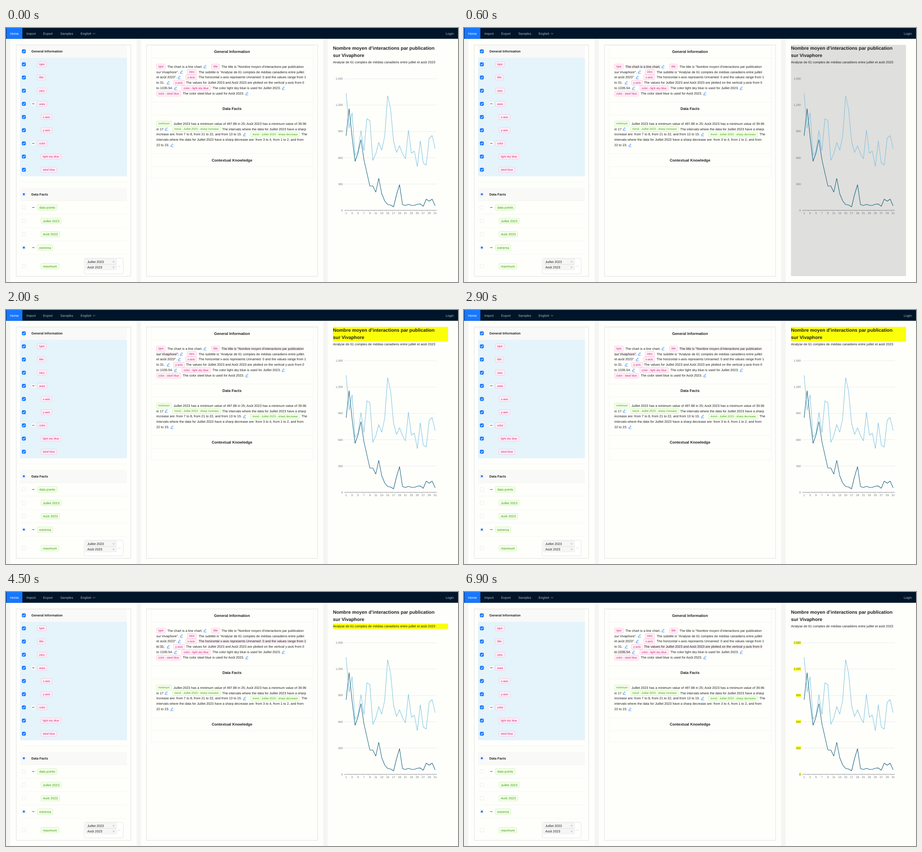
These frames come from a looping animation (998 by 561 pixels, 8 s). An HTML page:

```html
<!DOCTYPE html>
<html lang="en">
<head>
<meta charset="utf-8">
<title>Chart description</title>
<style>
html, body { margin: 0; width: 100%; height: 100%; overflow: hidden; background: #f5f5f3; }
svg { display: block; width: 100vw; height: 100vh; }
text { font: 7.28px "Liberation Sans", Arial, sans-serif; fill: #1f1f1f; text-rendering: geometricPrecision; }
.bold { font-weight: 700; }
.head { font-weight: 700; font-size: 8.32px; text-anchor: middle; }
.title { font-weight: 700; font-size: 10.4px; }
.nav { fill: #b0b6bd; }
.axis { font-size: 6.24px; fill: #6e7079; }
.small { font-size: 6.24px; }
.pink { fill: #c41d7f; }
.green { fill: #389e0d; }
.show { opacity: 0; animation: 8s step-end infinite; }
.mark { fill: #fbff0a; }
.hover { fill: #f7eef3; }

@keyframes typeText  { 0% { opacity: 0 } 7.5%   { opacity: 1 } 23.75% { opacity: 0 } }
@keyframes chartBg   { 0% { opacity: 0 } 7.5%   { opacity: 1 } 25%    { opacity: 0 } }
@keyframes titleText { 0% { opacity: 0 } 23.75% { opacity: 1 } 42.5%  { opacity: 0 } }
@keyframes titleBg   { 0% { opacity: 0 } 25%    { opacity: 1 } 42.5%  { opacity: 0 } }
@keyframes introText { 0% { opacity: 0 } 42.5%  { opacity: 1 } 56.25% { opacity: 0 } }
@keyframes introBg   { 0% { opacity: 0 } 42.5%  { opacity: 1 } 62.5%  { opacity: 0 } }
@keyframes xText     { 0% { opacity: 0 } 56.25% { opacity: 1 } 81.25% { opacity: 0 } }
@keyframes xBg       { 0% { opacity: 0 } 73.75% { opacity: 1 } 86.25% { opacity: 0 } }
@keyframes yText     { 0% { opacity: 0 } 81.25% { opacity: 1 } 100%   { opacity: 1 } }
@keyframes yBg       { 0% { opacity: 0 } 86.25% { opacity: 1 } 100%   { opacity: 1 } }
</style>
</head>
<body>
<svg id="stage" viewBox="0 0 998 561" preserveAspectRatio="none"></svg>
<script>
const stage = document.getElementById('stage');

function add(tag, attrs, content) {
  const el = document.createElementNS('http://www.w3.org/2000/svg', tag);
  for (const k in attrs) el.setAttribute(k, attrs[k]);
  if (content !== undefined) el.textContent = content;
  return stage.appendChild(el);
}
const rect = (x, y, w, h, attrs) => add('rect', { x, y, width: w, height: h, ...attrs });
const text = (x, y, str, cls = '', attrs) => add('text', { x, y, class: cls, ...attrs }, str);
const path = (d, stroke, width = 1, attrs) =>
  add('path', { d, stroke, 'stroke-width': width, fill: 'none', ...attrs });
const hline = (x1, x2, y, stroke, width = .6) => path(`M${x1} ${y}H${x2}`, stroke, width);

function show(el, name, cls) {
  el.setAttribute('class', 'show ' + cls);
  el.style.animationName = name;
  return el;
}

// Text with a background that appears under the given animation
function lit(x, y, str, name) {
  const t = text(x, y, str);
  const w = t.getComputedTextLength();
  stage.insertBefore(show(rect(x - .5, y - 6.7, w + 1, 8.6), name, 'hover'), t);
}

const tagColors = { pink: ['#fff0f6', '#ffadd2'], green: ['#f6ffed', '#b7eb8f'] };
function tag(x, cy, str, color, size = 'small', h = 11.2) {
  const t = text(x + 4.2, cy + (size ? 2.1 : 2.6), str, `${color} ${size}`);
  const [fill, stroke] = tagColors[color];
  const box = rect(x + .25, cy - h / 2, t.getComputedTextLength() + 7.9, h,
    { rx: 1.8, fill, stroke, 'stroke-width': .6 });
  stage.insertBefore(box, t);
}

function pencil(x, cy) {
  path(`M${x} ${cy + 3.2}h6.4M${x + .8} ${cy + 1.6}l.4-1.7 3.4-3.2 1.3 1.3-3.4 3.2z`, '#1677ff', .75);
}

const chevron = (x, y, color) => path(`M${x - 2.7} ${y - 1.3}l2.7 2.8 2.7-2.8`, color, .8);

function checkbox(cy, state) {
  const on = state === 'on';
  rect(35.4, cy - 4, 8, 8, {
    rx: 1.8, fill: on ? '#1677ff' : '#fff', stroke: on ? '#1677ff' : '#d9d9d9', 'stroke-width': .55
  });
  if (on) path(`M37.3 ${cy}l1.6 1.7 2.8-3.4`, '#fff', 1.05);
  if (state === 'part') rect(37.3, cy - 2.1, 4.2, 4.2, { fill: '#1677ff' });
}

function minus(cy) {
  rect(56, cy - 4.2, 8.6, 8.4, { rx: 1.8, fill: '#fff', 'fill-opacity': .8, stroke: '#f0f0f0', 'stroke-width': .5 });
  hline(57.8, 62.8, cy, '#222', .9);
}

function header() {
  rect(0, 0, 998, 23.8, { fill: '#001529' });
  rect(.8, 0, 35.4, 23.8, { fill: '#1677ff' });
  text(9, 14.8, 'Home', 'nav', { style: 'fill:#fff' });
  [[45, 'Import'], [82, 'Export'], [120, 'Samples'], [164.7, 'English'], [971, 'Login']]
    .forEach(([x, s]) => text(x, 14.8, s, 'nav'));
  chevron(194.4, 12.3, '#b0b6bd');
}

function panels() {
  [[9.5, 279], [298, 402.5], [710.3, 290]].forEach(([x, w]) =>
    rect(x, 23.8, w, 545, { rx: 3, fill: '#fefffb' }));
  rect(22.7, 37.3, 252.8, 511.4, { fill: 'none', stroke: '#d9d9d9', 'stroke-width': .8 });
  rect(310.2, 37.3, 377.8, 511.4, { fill: 'none', stroke: '#d9d9d9', 'stroke-width': .8 });
}

function options() {
  rect(31, 38, 236, 28.2, { fill: '#f9f9f8' });
  checkbox(51.5, 'on');
  text(56, 54.1, 'General Information', 'bold');
  rect(31, 66, 236, 261.5, { fill: '#e5f3fb' });
  const general = ['type', 'title', 'intro', '-axes', ' x-axis', ' y-axis', '-color', ' light sky blue', ' steel blue'];
  general.forEach((s, i) => {
    const cy = 80.2 + i * 29.1;
    checkbox(cy, 'on');
    if (s[0] === '-') minus(cy);
    tag(s[0] === ' ' ? 77 : 69, cy, s.replace(/^[- ]/, ''), 'pink');
  });
  hline(31, 267, 340, '#ebebe8');

  rect(31, 353.3, 236, 28.2, { fill: '#f9f9f8' });
  checkbox(367.2, 'part');
  text(56, 369.8, 'Data Facts', 'bold');
  [['data points', 396.4, 69], ['Juillet 2023', 426, 77], ['Août 2023', 455.5, 77], ['extrema', 485, 69], ['maximum', 526, 77]]
    .forEach(([s, cy, x]) => {
      checkbox(cy, s === 'extrema' ? 'part' : 'off');
      if (x === 69) minus(cy);
      tag(x, cy, s, 'green', '', 12);
    });
  [381.5, 411.2, 440.7, 470.2, 499.8].forEach(y => hline(31, 267, y, '#f0f0ee'));

  rect(172.7, 508.5, 86.2, 34.7, { rx: 3, fill: '#fff', stroke: '#d9d9d9', 'stroke-width': .7 });
  [['Juillet 2023', 516], ['Août 2023', 528.3]].forEach(([s, cy]) => {
    rect(175.6, cy - 5.8, 68.4, 11.6, { rx: 1.6, fill: '#f6f6f5', stroke: '#dedede', 'stroke-width': .6 });
    text(179.4, cy + 2.5, s);
    path(`M235.8 ${cy - 1.5}l3.6 3.6m0-3.6l-3.6 3.6`, '#999', .7);
  });
  chevron(250.2, 526, '#c4c4c4');
}

function description() {
  [38.3, 66.5, 163.4, 192, 277.2, 306.2, 331].forEach(y => hline(320, 679, y, '#ececea'));
  path('M320.3 38V331M678.7 38V331', '#f0f0ee', .6);
  text(499, 55, 'General Information', 'head');
  text(499, 181, 'Data Facts', 'head');
  text(499, 294.6, 'Contextual Knowledge', 'head');

  const row = i => 85.2 + i * 11.93;
  const base = i => row(i) + 2.4;
  [[332, 0, 'type'], [453.5, 0, 'title'], [400, 1, 'intro'], [396.5, 2, 'x-axis'], [369.6, 3, 'y-axis'],
   [388, 4, 'color - light sky blue'], [332, 5, 'color - steel blue']]
    .forEach(([x, i, s]) => tag(x, row(i), s, 'pink'));
  [[436, 0], [384, 1], [379.2, 2], [355, 3], [371, 4], [609, 4], [528.5, 5]].forEach(([x, i]) => pencil(x, row(i)));
  lit(356.2, base(0), 'The chart is a line chart.', 'typeText');
  lit(475.8, base(0), 'The title is "Nombre moyen d’interactions par publication', 'titleText');
  lit(332, base(1), 'sur Vivaphore".', 'titleText');
  lit(425.4, base(1), 'The subtitle is "Analyse de 61 comptes de médias canadiens entre juillet', 'introText');
  lit(332, base(2), 'et août 2023".', 'introText');
  lit(425.2, base(2), 'The horizontal x-axis represents Unnamed: 0 and the values range from 1', 'xText');
  lit(332, base(3), 'to 31.', 'xText');
  lit(397.4, base(3), 'The values for Juillet 2023 and Août 2023 are plotted on the vertical y-axis from 0', 'yText');
  lit(332, base(4), 'to 1335.54.', 'yText');
  text(455.8, base(4), 'The color light sky blue is used for Juillet 2023.');
  text(390.2, base(5), 'The color steel blue is used for Août 2023.');

  const fact = i => 211.3 + i * 11.93;
  tag(332, fact(0), 'minimum', 'green');
  tag(367.7, fact(1), 'trend - Juillet 2023 - sharp increase', 'green');
  tag(540.2, fact(2), 'trend - Juillet 2023 - sharp decrease', 'green');
  [[350.5, 1], [523.5, 2], [363.2, 4]].forEach(([x, i]) => pencil(x, fact(i)));
  [[369.9, 0, 'Juillet 2023 has a minimum value of 497.88 in 25; Août 2023 has a minimum value of 39.96'],
   [332, 1, 'in 17'],
   [477.5, 1, 'The intervals where the data for Juillet 2023 have a sharp'],
   [332, 2, 'increase are: from 7 to 8, from 21 to 22, and from 13 to 15.'],
   [652.6, 2, 'The'],
   [332, 3, 'intervals where the data for Juillet 2023 have a sharp decrease are: from 3 to 4, from 1 to 2, and from'],
   [332, 4, '22 to 23.']].forEach(([x, i, s]) => text(x, fact(i) + 2.3, s));
}

function axisLabel(x, y, str, anchor, name) {
  const t = text(x, y, str, 'axis', { 'text-anchor': anchor });
  const w = t.getComputedTextLength();
  const left = anchor === 'end' ? x - w : x - w / 2;
  stage.insertBefore(show(rect(left - .2, y - 5.7, w + .4, 6.9), name, 'mark'), t);
}

function chart() {
  show(rect(722, 37.3, 254, 510.7), 'chartBg', '').setAttribute('fill', '#dfdfdd');
  show(rect(722, 37.3, 254, 32.5), 'titleBg', 'mark');
  show(rect(722, 69.8, 254, 11.8), 'introBg', 'mark');
  text(722, 47.9, 'Nombre moyen d’interactions par publication', 'title');
  text(722, 63.8, 'sur Vivaphore', 'title');
  text(722, 78.2, 'Analyse de 61 comptes de médias canadiens entre juillet et août 2023');

  const px = day => 751 + (day - 1) * 6.55;
  for (let v = 0; v <= 1500; v += 300) {
    const y = 402.7 - v * .19367;
    hline(747.5, 951.3, y, v ? '#e0e2e4' : '#6e7079', v ? .7 : .8);
    axisLabel(743.7, y + 2.1, v.toLocaleString('en-US'), 'end', 'yBg');
  }
  for (let d = 1; d <= 31; d += 2) {
    path(`M${px(d) - 3.27} 402.7v2.4`, '#6e7079', .35);
    axisLabel(px(d), 411.2, d, 'middle', 'xBg');
  }
  const curve = (ys, color) => path('M' + ys.map((y, i) => `${px(i + 1)} ${y}`).join('L'), color, 1.1,
    { 'stroke-linejoin': 'bevel' });
  curve([144, 221.5, 187, 281, 272, 226.5, 271, 200.5, 204.5, 292.5, 278, 253, 270, 239, 149.5, 180, 250.5, 275, 260,
    277.5, 289, 225.5, 276.5, 272, 306.2, 249, 298, 302.7, 243.5, 237.5, 266.5], '#7fc3e2');
  curve([238, 178, 240, 294.5, 276, 246.5, 291, 320, 349, 349, 362.5, 332, 366, 382, 389.8, 391, 395, 368, 346,
    390, 392, 389.5, 391.7, 391.7, 389.2, 388.6, 393.7, 378, 382.5, 378, 392.7], '#17607f');
}

panels();
header();
options();
description();
chart();
</script>
</body>
</html>
```
